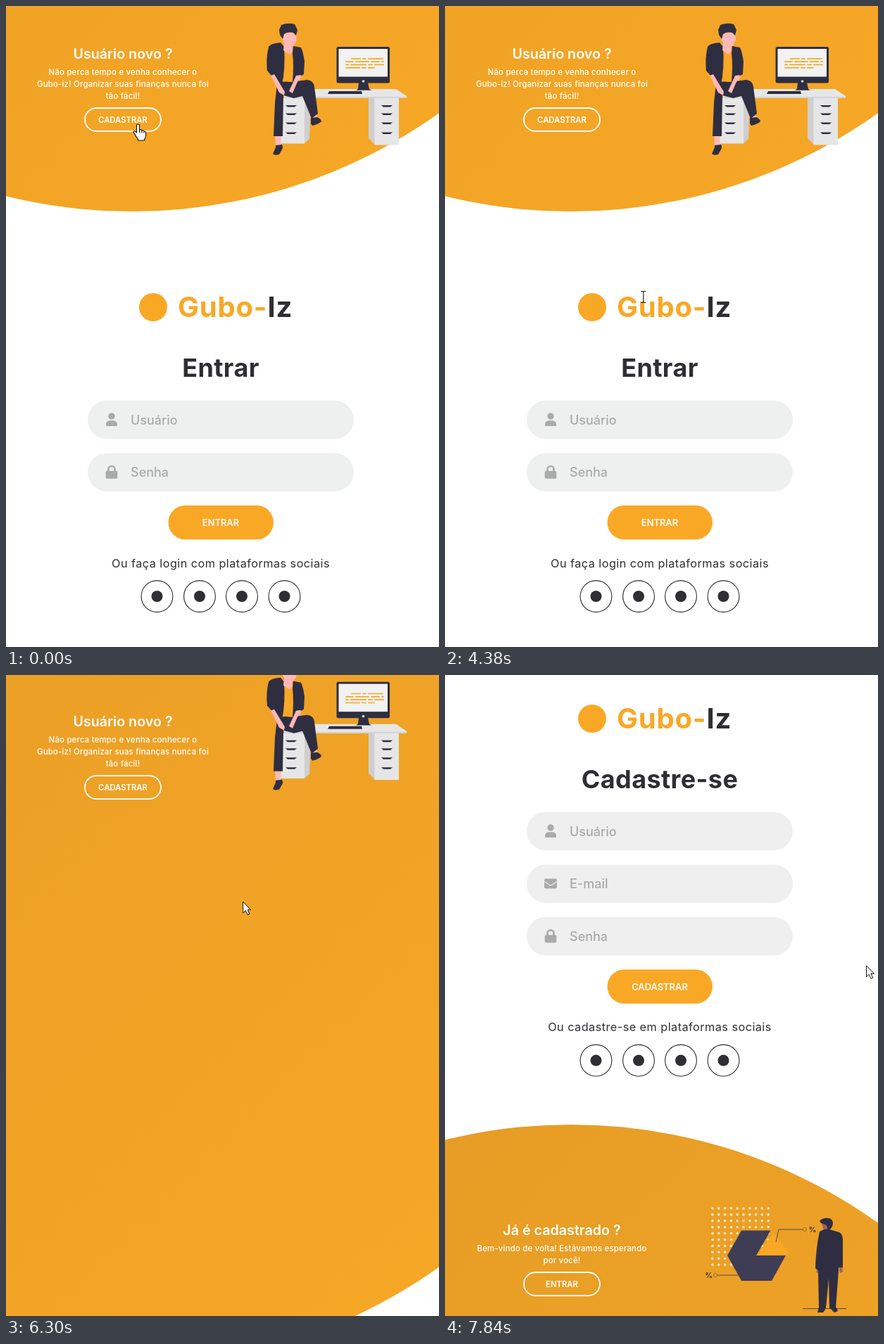
These frames come from a looping animation (615 px wide and 911 px high, 7.91 s). An HTML page:

```html
<!DOCTYPE html>
<html lang="pt">
<head>
<meta charset="utf-8">
<title>Entrar</title>
<style>
html, body { margin: 0; width: 100%; height: 100%; overflow: hidden; background: #fff; }
svg { display: block; width: 615px; height: 911px; font-family: Inter, sans-serif; }
.mid { text-anchor: middle; }
.brand { font-size: 40px; font-weight: 700; letter-spacing: .8px; }
.title { font-size: 36px; font-weight: 700; letter-spacing: .4px; }
.hint { font-size: 18px; font-weight: 500; fill: #aaa; }
.btn { font-size: 12.9px; font-weight: 600; fill: #fff; }
.social { font-size: 16.3px; letter-spacing: .44px; }
.head { font-size: 19.7px; font-weight: 600; }
.copy { font-size: 11.4px; font-weight: 500; letter-spacing: .2px; }
.ghost { font-size: 11.3px; font-weight: 600; }
.pct { font-size: 11px; font-weight: 600; }
</style>
</head>
<body>
<svg id="stage" viewBox="0 0 615 911" xmlns="http://www.w3.org/2000/svg"></svg>
<script>
const LOOP = 7910;
const SWITCH_AT = 5466;   // moment of the click that changes the form
const PACE = 0.9815;      // playback time per transition time
const INK = '#2f2e33', NAVY = '#2f2e41', AMBER = '#f9a826', SKIN = '#ffb8b8';
const SOCIAL_X = [214.5, 275, 335, 395.5];

const text = (cls, x, y, s, extra = '') => `<text class="${cls}" x="${x}" y="${y}" ${extra}>${s}</text>`;
const shape = (d, fill, extra = '') => `<path d="${d}" fill="${fill}" ${extra}/>`;
const box = (x, y, w, h, fill, r = 0) => `<rect x="${x}" y="${y}" width="${w}" height="${h}" rx="${r}" fill="${fill}"/>`;
const dot = (x, y, r, fill, extra = '') => `<circle cx="${x}" cy="${y}" r="${r}" fill="${fill}" ${extra}/>`;
const range = (n, f) => Array.from({ length: n }, (_, i) => f(i)).join('');

const icons = {
  user: dot(150, -5, 4.7, '#aaa') +
    shape('M142 8V6.5a5.2 5.2 0 0 1 5.2-5.2h5.6a5.2 5.2 0 0 1 5.2 5.2V8q0 1-1 1h-14q-1 0-1-1z', '#aaa'),
  lock: box(141.7, -1.8, 16.6, 11, '#aaa', 1.8) +
    shape('M145.4 0v-4a4.6 4.6 0 0 1 9.2 0v4', 'none', 'stroke="#aaa" stroke-width="2.7"'),
  mail: box(141, -7, 18, 14, '#aaa', 2) +
    shape('M141-3.2l7.4 5.2q1.6 1 3.2 0l7.4-5.2', 'none', 'stroke="#eee" stroke-width="1.2"')
};

function form(id, top, title, fields, action, social, tint) {
  const rows = fields.map(([icon, label], i) =>
    `<g transform="translate(0 ${top + 160 + i * 74.6})">` +
    box(116, -27.2, 378, 54.5, tint, 27.2) + icons[icon] + text('hint', 177, 6.5, label) + '</g>').join('');
  const y = top + 306 + (fields.length - 2) * 74.8;
  const buttons = SOCIAL_X.map(x =>
    `<g class="net" fill="${INK}" stroke="${INK}">` +
    `<circle cx="${x}" cy="${y + 105}" r="22.4" fill="none" stroke-width="1.1"/>` +
    `<circle cx="${x}" cy="${y + 105}" r="8" stroke="none"/></g>`).join('');
  return `<g id="${id}" fill="${INK}">` + dot(209, top, 20, AMBER) +
    text('brand', 244, top + 14, `<tspan fill="${AMBER}">Gubo-</tspan>Iz`) +
    text('title mid', 305, top + 99, title) + rows +
    box(230.5, y - 24.3, 149.5, 48.6, AMBER, 24.3) + text('btn mid', 305, y + 4.7, action) +
    text('social mid', 305, y + 63.5, social) + buttons + '</g>';
}

function panelText(id, head, y, lines, action) {
  const end = y + 8 + lines.length * 17;
  return `<g id="${id}" fill="#fff">` + text('head mid', 166, y, head) +
    lines.map((s, i) => text('copy mid', 166, y + 22.5 + i * 17, s)).join('') +
    `<rect x="112" y="${end + 11}" width="108" height="33" rx="16.5" fill="none" stroke="#fff" stroke-width="1.8"/>` +
    text('ghost mid', 166, end + 31.5, action) + '</g>';
}

function deskScene() {
  const handles = x => [142, 153.5, 166.5, 180.5].map(y =>
    shape(`M${x - 8} ${y - 1}h16l-3 2.5h-10z`, NAVY)).join('');
  const bars = (y, parts) => parts.map(([x, w]) => box(x, y, w, 1.7, AMBER, .8)).join('');
  return '<g id="desk">' +
    shape('M424 131h9l-2 58-7 6z', '#cfcfd1') + box(390, 131, 34, 64.5, '#e6e6e6') +
    shape('M515 130h9v67l-9-9z', '#cfcfd1') + box(523.5, 130, 34.5, 67.5, '#e6e6e6') +
    shape('M406 118h148l15 10v3H395v-5z', '#e6e6e6') + shape('M395 129h174v2H395z', '#d3d3d5') +
    handles(405) + handles(541) +
    box(469.5, 58, 75.5, 51.5, NAVY, 2.5) + box(472.5, 61, 69.5, 39.5, '#f2f2f2') +
    dot(507.5, 107, 1.8, '#e6e6e6') + shape('M501 109h13l2 9 3 1.8h-22l3-2z', NAVY) +
    shape('M459 121h46l1 4h-49z', NAVY) +
    bars(74, [[490, 14], [506, 6], [514, 22]]) + bars(78.3, [[482, 12], [496, 20], [518, 13], [533, 4]]) +
    bars(82.6, [[482, 5], [489, 23], [514, 7], [523, 14]]) + bars(87, [[482, 21], [505, 7], [514, 10]]) +
    // seated figure
    shape('M382 183h9l-1 17h-7zM434 147l8 10-5 6-8-9zM378 99l10-2 11 24-2 7-6-4zM412 97l8 2-7 16-7 9z', SKIN) +
    shape('M394 60h14l-1 54h-12z', AMBER) +
    shape('M385 111q6-5 19-3l24-3q9 1 10 10l5 38-9 7-13-32-12 3-15-4-1 58h-13l2-48z', NAVY) +
    shape('M433 159l9-1q6 3 6 6-4 4-13 6l-2-3zM383 198l9-1q2 4 0 7l-4 7q-7 2-9-1l4-9z', NAVY) +
    shape('M390 52l5 6q2 30-3 54l-8-5-4-5-9-10q-2-18 2-34 3-5 17-6zM408 57l11 2q3 6 5 20l-1 18-9 5-1 9-6-4q2-21 0-40z', NAVY) +
    shape('M376 99l5-2 15 25-1 5-7-4zM412 99l7-1-6 12-6 14-5-3z', SKIN) +
    shape('M393 38h19l1 9q-2 9-7 11l1 6-4 5-9-6 1-10-4-9z', SKIN) +
    shape('M388 34l3-7q10-4 19-1l4 8-2 8-4-4q-8-2-13 2l-2 7-4-6z', NAVY) + '</g>';
}

function chartScene() {
  const line = d => shape(d, 'none', 'stroke="#3f3d56" stroke-width=".9"');
  const ring = (x, y) => dot(x, y, 2.6, 'none', 'stroke="#8a6a35" stroke-width=".8"');
  return '<g id="chart">' +
    range(100, i => dot(380 + i % 10 * 8.8, 758 + Math.floor(i / 10) * 8.9, 1.8, '#f7e6c9')) +
    shape('M421 789.5h41.5L442 825h42l-20 36h-43l-20-36z', '#3f3d56') +
    shape('M467 792l22 31-46 2z', AMBER) +
    line('M470 806l4-18h34') + ring(511, 788) + line('M387 853h31l4-9') + ring(384, 853) +
    text('pct mid', 522, 792, '%', `fill="${NAVY}"`) + text('pct mid', 374.8, 857, '%', `fill="${NAVY}"`) +
    // standing figure
    line('M508 900.5h62') +
    shape('M527 840h5v9l-4 1zM559 840h5l1 8-4 2zM535 778h11l1 12h-9z', '#9f616a') +
    shape('M532 776q5-5 13-4 6 1 6 8-1 7-7 9l-2-7-8-3z', NAVY) +
    shape('M532 791q8-5 14-3l14 4q4 2 5 9v41h-6v4l-4 54h-9l-1-42-4 42h-10l-1-54-4-3q1-30 6-52z', NAVY) +
    shape('M531 899h8l1 3-3 4h-8zM546 899h10l2 5-5 2z', NAVY) + '</g>';
}

const pointerArt = {
  arrow: shape('M0 0v16l3.7-3.5 2.8 6 2.7-1.2-2.7-5.8H11z', '#fff', 'stroke="#111" stroke-width="1"'),
  hand: shape('M-2 1.8Q-2 0 0 0T2 1.8V8q3-.8 3.4 1 2.6-.7 3.1 1 2.6-.3 2.6 2v4q0 3-2 5v2H0v-2q-3-3-4.3-6.5-1.7-2-2.2-4 2-2 4.5 1.5zM2 8v4M5.4 9v3.4M8.5 10v2.8',
    '#fff', 'stroke="#111" stroke-width="1.1" stroke-linejoin="round"'),
  beam: shape('M-3.5-8h2.7l.8.8.8-.8h2.7M-3.5 8h2.7l.8-.8.8.8h2.7M0-7.5v15', 'none', 'stroke="#111" stroke-width="1.1"')
};

// time, x, y, look
const route = [
  [0, 187.5, 168, 'hand'], [100, 187.5, 168, 'hand'], [450, 320, 290, 'arrow'], [840, 440, 500, 'arrow'],
  [1150, 400, 588, 'beam'], [1500, 392, 590, 'beam'], [1850, 440, 662, 'beam'], [2180, 345, 728, 'hand'],
  [2400, 310, 770, 'arrow'], [2650, 272, 842, 'hand'], [2900, 272, 842, 'hand'], [3200, 334, 842, 'hand'],
  [3500, 334, 842, 'hand'], [3850, 330, 745, 'hand'], [4000, 310, 640, 'beam'], [4380, 282, 414, 'beam'],
  [4550, 255, 330, 'arrow'], [4950, 192, 166, 'hand'], [5560, 192, 166, 'hand'], [5750, 240, 220, 'arrow'],
  [6070, 331, 325.5, 'arrow'], [6680, 346, 317, 'arrow'], [6990, 406.5, 365, 'beam'],
  [7220, 500, 395, 'arrow'], [7600, 598.5, 413, 'arrow'], [LOOP, 598.5, 413, 'arrow']
];

const stage = document.getElementById('stage');
stage.innerHTML =
  `<defs><linearGradient id="glow" x1="0" y1="0" x2="1" y2="1">
   <stop offset="0" stop-color="#e29a25"/><stop offset="1" stop-color="#faa926"/></linearGradient></defs>` +
  box(0, 0, 615, 911, '#fff') +
  form('signIn', 428, 'Entrar', [['user', 'Usuário'], ['lock', 'Senha']], 'ENTRAR',
    'Ou faça login com plataformas sociais', '#eef0ef') +
  form('signUp', 62, 'Cadastre-se', [['user', 'Usuário'], ['mail', 'E-mail'], ['lock', 'Senha']], 'CADASTRAR',
    'Ou cadastre-se em plataformas sociais', '#efefef') +
  box(176.5, 576, 1.2, 25, INK).replace('<rect', '<rect id="caret"') +
  dot(179, 0, 750, 'url(#glow)', 'id="disc"') +
  panelText('newUser', 'Usuário novo ?', 75, ['Não perca tempo e venha conhecer o',
    'Gubo-iz! Organizar suas finanças nunca foi', 'tão fácil!'], 'CADASTRAR') + deskScene() +
  panelText('oldUser', 'Já é cadastrado ?', 796, ['Bem-vindo de volta! Estávamos esperando',
    'por você!'], 'ENTRAR') + chartScene() +
  '<g id="pointer"></g>';

const el = id => document.getElementById(id);
const shift = (id, y) => el(id).setAttribute('transform', `translate(0 ${y})`);
const show = (id, opacity) => el(id).setAttribute('opacity', opacity);
const clamp = v => Math.min(1, Math.max(0, v));
const nets = [...document.querySelectorAll('#signIn .net')];

// cubic-bezier(.42, 0, .58, 1)
function easeInOut(x) {
  let lo = 0, hi = 1;
  for (let i = 0; i < 24; i++) {
    const s = (lo + hi) / 2, r = 1 - s;
    if (1.26 * r * r * s + 1.74 * r * s * s + s * s * s < x) lo = s; else hi = s;
  }
  return lo * lo * (3 - 2 * lo);
}

function pointerAt(t) {
  const i = Math.max(1, route.findIndex(k => k[0] > t));
  const a = route[i - 1], b = route[i];
  const u = clamp((t - a[0]) / (b[0] - a[0]));
  return { x: a[1] + (b[1] - a[1]) * u, y: a[2] + (b[2] - a[2]) * u, look: a[3] };
}

let look = '';
function draw(t) {
  const since = (t - SWITCH_AT) / PACE;
  const phase = (delay, length) => {
    const x = clamp((since - delay) / length);
    return x === 0 || x === 1 ? x : easeInOut(x);
  };
  const image = phase(600, 900), copy = phase(800, 900), slide = phase(800, 1000);
  const fade = clamp((since - 700) / 200);

  el('disc').setAttribute('cy', -458 + 1847 * phase(0, 2000));
  shift('signIn', -328.5 * slide);
  shift('signUp', 328.5 * (1 - slide));
  show('signIn', 1 - fade);
  show('signUp', fade);
  shift('newUser', -300 * copy);
  shift('desk', -300 * image);
  shift('oldUser', 300 * (1 - copy));
  shift('chart', 300 * (1 - image));
  show('caret', t > 1250 && t < 3700 && (t - 1250) % 1060 < 560 ? 1 : 0);

  const p = pointerAt(t);
  nets.forEach((net, i) => {
    const hot = Math.hypot(p.x - SOCIAL_X[i], p.y - 839) < 22.5;
    net.setAttribute('fill', hot ? AMBER : INK);
    net.setAttribute('stroke', hot ? AMBER : INK);
  });
  if (p.look !== look) el('pointer').innerHTML = pointerArt[look = p.look];
  el('pointer').setAttribute('transform', `translate(${p.x} ${p.y})`);
}

function tick() {
  draw(performance.now() % LOOP);
  requestAnimationFrame(tick);
}
tick();
</script>
</body>
</html>
```
